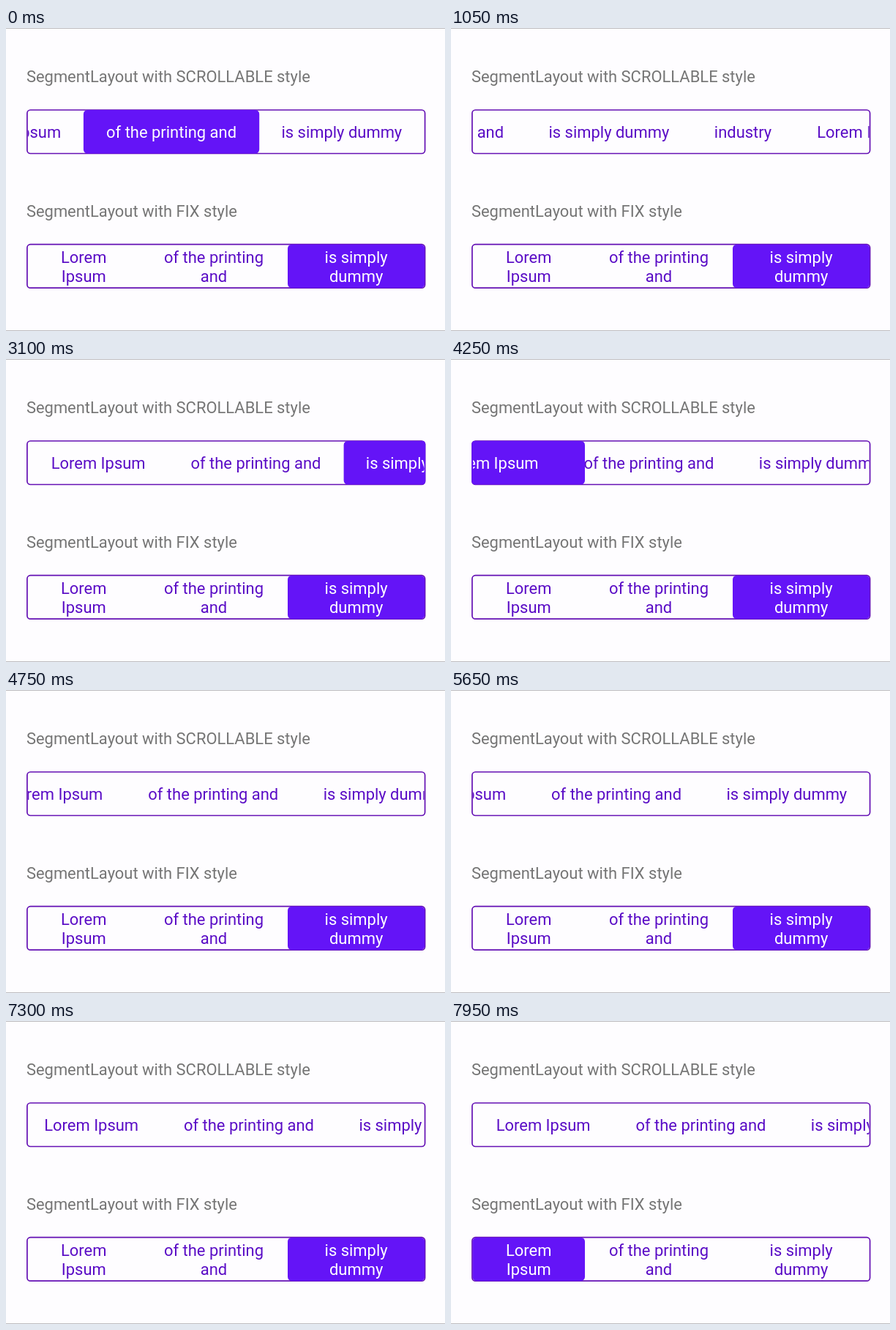
Write an HTML page with a canvas that moves like this. It is 600x414 px and loops after 8 s.

```html
<!DOCTYPE html>
<html lang="en">
<head>
<meta charset="utf-8">
<title>Segment layouts</title>
<style>
  html, body { margin: 0; width: 100%; height: 100%; overflow: hidden; background: #fefdff; }
  canvas { display: block; width: 600px; height: 414px; }
</style>
</head>
<body>
<canvas id="stage"></canvas>
<script>
const LOOP = 8000;
const FILL = '#6414f7', INK = '#5a0cc6', EDGE = '#6410b4', PAPER = '#fefdff', GREY = '#757575';
const FONT = '21.95px Roboto, sans-serif';
const LEFT = 30, RIGHT = 571.5, HEIGHT = 59.5;

const canvas = document.getElementById('stage');
const ctx = canvas.getContext('2d');
const ratio = window.devicePixelRatio || 1;
canvas.width = 600 * ratio;
canvas.height = 414 * ratio;

// Places items side by side from x on.
function row(x, items) {
  return items.map(([w, ...lines]) => {
    const item = { x, w, lines };
    x += w;
    return item;
  });
}

const phrases = [[190.3, 'Lorem Ipsum'], [240.3, 'of the printing and'], [225.3, 'is simply dummy']];
const scrollItems = row(31, [...phrases, [141, 'industry'], ...phrases]);
const fixItems = row(29.5, [
  [153.5, 'Lorem', 'Ipsum'], [202, 'of the printing', 'and'], [187.2, 'is simply', 'dummy']
]);

const last = scrollItems[scrollItems.length - 1];
const END = last.x + last.w - RIGHT;

// Each event: start time and new value.
const flings = [[700, 0], [4168, END], [6615, 0]];
const scrollTaps = [[1400, 2], [3700, 0], [6150, 5]];
const fixTaps = [[7690, 0]];
const LAG = 27; // the indicator trails a fling by this many ms

const mix = (a, b, p) => a + (b - a) * p;
const smooth = u => u * u * (3 - 2 * u);
const fling = u => 1 - (1 - u ** 1.6) ** 3;

// Latest change before t: where it came from, where it goes, how far it is.
function latest(events, first, t, span, ease) {
  let from = first, to = first, p = 1;
  for (const [start, value] of events) {
    if (t < start) break;
    from = to;
    to = value;
    p = ease(Math.min(1, (t - start) / span));
  }
  return { from, to, p };
}

function scrollAt(t) {
  const move = latest(flings, END, t, 800, fling);
  return mix(move.from, move.to, move.p);
}

function label(text, x, y, color, align) {
  ctx.font = FONT;
  ctx.textAlign = align;
  ctx.fillStyle = color;
  ctx.fillText(text, x, y);
}

function rounded(x, y, w, h, r) {
  ctx.beginPath();
  ctx.roundRect(x, y, w, h, r);
}

function clipped(x, y, w, h, r, paint) {
  ctx.save();
  rounded(x, y, w, h, r);
  ctx.clip();
  paint();
  ctx.restore();
}

function drawItem(item, scroll, baseline, color) {
  item.lines.forEach((line, i) =>
    label(line, item.x + item.w / 2 - scroll, baseline + i * 26, color, 'center'));
}

// Plain labels lie under the indicator, the chosen one above it.
function segments(items, move, top, baseline, scroll = 0, boxScroll = 0) {
  const a = items[move.from], b = items[move.to];
  const x = mix(a.x, b.x, move.p) - boxScroll;
  const w = mix(a.w, b.w, move.p);
  const inside = paint => clipped(LEFT, top, RIGHT - LEFT, HEIGHT, 0, paint);

  inside(() => items.forEach(item => {
    if (item !== b) drawItem(item, scroll, baseline, INK);
  }));

  rounded(28.9, top, 543.7, HEIGHT, 4.5);
  ctx.strokeStyle = EDGE;
  ctx.lineWidth = 1.7;
  ctx.stroke();

  clipped(28.2, top - 0.5, 545, HEIGHT + 1, 5, () => {
    rounded(x, top, w, HEIGHT, 5.5);
    ctx.fillStyle = FILL;
    ctx.fill();
  });
  inside(() => drawItem(b, scroll, baseline, '#fff'));
}

function draw(t) {
  ctx.setTransform(ratio, 0, 0, ratio, 0, 0);
  ctx.fillStyle = PAPER;
  ctx.fillRect(0, 0, 600, 414);
  ctx.fillStyle = '#bdbcbf';
  ctx.fillRect(0, 0, 600, 1);
  ctx.fillRect(0, 413, 600, 1);

  label('SegmentLayout with SCROLLABLE style', 27.9, 74.3, GREY, 'left');
  label('SegmentLayout with FIX style', 27.9, 258.3, GREY, 'left');

  segments(scrollItems, latest(scrollTaps, 5, t, 300, smooth), 112, 150.2, scrollAt(t), scrollAt(t - LAG));
  segments(fixItems, latest(fixTaps, 2, t, 250, smooth), 295.7, 321.2);
}

const began = performance.now();
function tick() {
  draw((performance.now() - began) % LOOP);
  requestAnimationFrame(tick);
}
tick();
</script>
</body>
</html>
```
